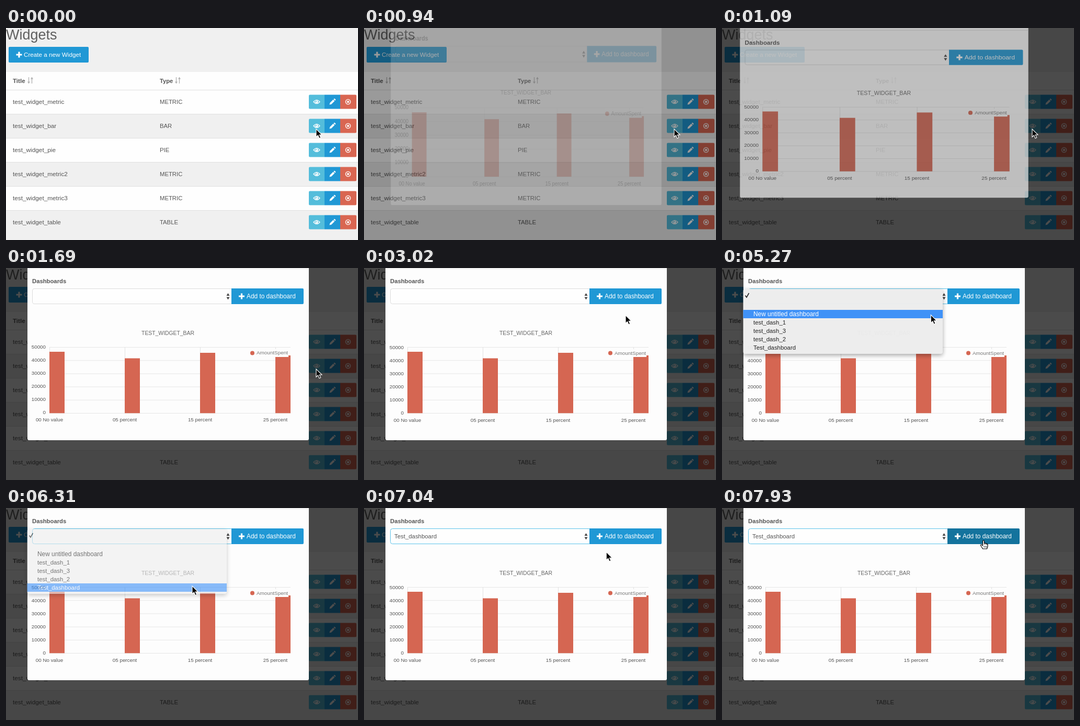
These frames come from a looping animation (673x405 px, 8000 ms). An HTML page:

```html
<!DOCTYPE html>
<html lang="en">
<head>
<meta charset="utf-8">
<title>Widgets</title>
<style>
  html, body { margin: 0; width: 100%; height: 100%; overflow: hidden; background: #f0f0f0; }
  svg { display: block; width: 673px; height: 405px; font-family: "Liberation Sans", Arial, sans-serif; }
</style>
</head>
<body>
<svg id="stage" viewBox="0 0 673 405" xmlns="http://www.w3.org/2000/svg"></svg>
<script>
const LOOP = 8000;
const BLUE = [32, 152, 213], DARK_BLUE = [20, 115, 157], RED = '#d56652';
const OPEN_AT = 862, OPEN_MS = 760;
const MENU_OPEN = 4370, MENU_FADE = 6310, MENU_CLOSED = 6450;

const rgb = c => `rgb(${c.map(Math.round)})`;
const mix = (a, b, k) => a.map((v, i) => v + (b[i] - v) * k);
const clamp = v => Math.max(0, Math.min(1, v));
const ease = k => (1 - Math.cos(Math.PI * clamp(k))) / 2;

const rect = (x, y, w, h, fill, extra = '') =>
  `<rect x="${x}" y="${y}" width="${w}" height="${h}" fill="${fill}" ${extra}/>`;
const text = (x, y, size, str, fill = '#555', extra = '') =>
  `<text x="${x}" y="${y}" font-size="${size}" fill="${fill}" ${extra}>${str}</text>`;
const path = (d, fill, extra = '') => `<path d="${d}" fill="${fill}" ${extra}/>`;
const line = (d, color, width = 1) => path(d, 'none', `stroke="${color}" stroke-width="${width}"`);
const group = (attrs, body) => `<g ${attrs}>${body}</g>`;
const at = (x, y, body) => group(`transform="translate(${x} ${y})"`, body);

const plus = (x, y) => line(`M${x - 5.5} ${y}h11M${x} ${y - 5.5}v11`, '#fff', 3.2);
const sortIcon = x => at(x, 94,
  line('M2.5 0V10M8.5 2V12', '#b0b0b0', 1.3) +
  path('M0 8.5h5l-2.5 4zM6 3.5h5l-2.5-4z', '#b0b0b0'));

const eye = at(594, 0,
  path('M-6 0Q0-7 6 0Q0 7-6 0z', 'none', 'stroke="#fff" stroke-width="1.2"') +
  '<circle r="2.7" fill="#fff"/><circle cx="-.6" cy="-.8" r="1" fill="#54bddb"/>');
const pencil = at(624, 0,
  path('M-5.5 5.5l.8-3.4L1.6-4.2l2.7 2.7L-2 4.8zM2.4-5l1-1q.6-.4 1.2 0l1.5 1.5q.4.6 0 1.2l-1 1z', '#fff'));
const cross = at(654, 0,
  '<circle r="4.6" fill="none" stroke="#fff" stroke-width="1.4"/>' +
  line('M-1.9-1.9L1.9 1.9M1.9-1.9L-1.9 1.9', '#fff', 1.5));

function rowButtons(y) {
  return at(0, y,
    path('M609-13.500h-28q-2 0-2 2v23q0 2 2 2h28z', '#54bddb') +
    rect(609, -13.5, 30, 27, rgb(BLUE)) +
    path('M639-13.500h29q2 0 2 2v23q0 2-2 2h-29z', '#d96652') +
    eye + pencil + cross);
}

function page() {
  const rows = [['metric', 'METRIC'], ['bar', 'BAR'], ['pie', 'PIE'],
    ['metric2', 'METRIC'], ['metric3', 'METRIC'], ['table', 'TABLE']];
  const table = rows.map(([name, type], i) => {
    const y = 141 + 46 * i;
    return rect(0, y - 22, 673, 46, i % 2 ? '#f0f0f0' : '#fefefe') +
      rect(0, y - 23, 673, 1, '#dfdfdf') +
      text(13, y + 4, 11.8, 'test_widget_' + name) +
      text(294, y + 4, 11.3, type) + rowButtons(y);
  }).join('');
  return rect(0, 0, 673, 405, '#f0f0f0') +
    text(0, 22, 27, 'Widgets', '#606060') +
    rect(5, 36, 153, 30, rgb(BLUE), 'rx="2"') + plus(25, 51) +
    text(34, 55, 11.7, 'Create a new Widget', '#fff') +
    rect(0, 84, 673, 35, '#fefefe') +
    text(13, 105, 11.6, 'Title', '#555', 'font-weight="bold"') + sortIcon(41) +
    text(294, 105, 11.2, 'Type', '#555', 'font-weight="bold"') + sortIcon(323) + table;
}

function chart() {
  const columns = [['00 No value', 160], ['05 percent', 172.5], ['15 percent', 162], ['25 percent', 167]];
  let out = text(309.5, 128, 10.4, 'TEST_WIDGET_BAR', '#666', 'text-anchor="middle"');
  for (let i = 0; i <= 5; i++) {
    const y = 151.5 + 25.2 * i;
    out += line(`M83 ${y}H544`, '#e6e6e6') +
      text(76, 154.5 + 25 * i, 9.8, i < 5 ? (5 - i) * 10000 : 0, '#555', 'text-anchor="end"');
  }
  columns.forEach(([label, top], i) => {
    const x = 83 + 144 * i;
    out += line(`M${x + .5} 151V277`, '#e2e2e2') + rect(x, top, 29, 277.3 - top, RED) +
      text(x, 293.5, 9.8, label, '#555', 'text-anchor="middle"');
  });
  return out + rect(465, 155, 75, 15, '#fdfdfd') +
    `<circle cx="471" cy="162.500" r="4" fill="${RED}"/>` +
    text(479, 165.5, 9.9, 'AmountSpent', '#777');
}

function modal() {
  return rect(41, -60, 538, 389, '#fdfdfd', 'rx="3"') + rect(41, 0.5, 538, 1, '#ddd') +
    text(50, 29, 11.3, 'Dashboards', '#555', 'font-weight="bold"') +
    rect(50.5, 39.5, 384, 29, '#fefefe', 'id="select" rx="4"') +
    path('M421.500 53l3-5 3 5zM421.500 55.500l3 5 3-5z', '#444') +
    text(58, 58, 11.4, 'Test_dashboard', '#555', 'id="choice"') +
    path('M431 39h136q2 0 2 2v26q0 2-2 2h-136z', rgb(BLUE), 'id="add"') + plus(450.5, 54) +
    text(460, 58, 11.9, 'Add to dashboard', '#fff') + chart();
}

const options = [['', 44], ['New untitled dashboard', 80], ['test_dash_1', 96],
  ['test_dash_3', 112], ['test_dash_2', 128], ['Test_dashboard', 144]];

function menu(cursorY) {
  const active = options.findIndex(([, top]) => cursorY >= top && cursorY < top + 17);
  const ink = i => i === active ? '#fff' : '#1c1c1c';
  return rect(40.5, 40, 381.5, 124, '#ededed', 'rx="4" style="filter:drop-shadow(0 3px 4px rgba(0,0,0,.35))"') +
    (active < 0 ? '' : rect(40.5, options[active][1], 381.5, 16, '#3a8ff7')) +
    line('M44.500 52.500l2.500 3.500 4.500-8', ink(0), 1.6) +
    options.map(([label, top], i) => text(60, top + 12, i === 1 ? 11.9 : 11.4, label, ink(i))).join('');
}

const arrow = path('M0 0V15.200L3.500 12 6 17.700 8.700 16.500 6.200 11H11z', '#000',
  'stroke="#fff" stroke-width="1.100"');
const hand = path('M-1.500 9V1.200Q-1.500 0 0 0T1.500 1.200V5.500Q3 4.600 4 6 5.500 5.200 6.300 6.700 8 6.300 8 8V11Q7.500 13 6.500 16H-1.500Q-3 13-5 10.500-6 8.700-4.500 8-3 8-1.500 10z',
  '#fff', 'stroke="#000" stroke-width="1.200" stroke-linejoin="round"') +
  line('M1.500 5.500V8M4 6.500V8M6.200 7V8.500M1 10.500V13.500M3.300 10.500V13.500M5.500 10.500V13.500', '#000', .8);

const stage = document.getElementById('stage');
stage.innerHTML = page() +
  rect(0, 0, 673, 405, '#000', 'id="backdrop"') +
  group('id="modal"', modal()) + group('id="menu"', '') +
  group('id="arrow"', arrow) + group('id="hand"', hand);
const part = Object.fromEntries([...stage.querySelectorAll('[id]')].map(el => [el.id, el]));
const set = (id, attrs) => {
  for (const name in attrs) part[id].setAttribute(name, attrs[name]);
};

// The picture advances in steps: first time, last time, count.
const steps = [0];
for (const [from, to, count] of [[500, 1540, 8], [1690, 1690, 1], [2430, 3320, 7], [3620, 4070, 4],
  [4370, 4520, 2], [5120, 5710, 5], [6310, 7340, 8], [7480, 7480, 1], [7930, 7930, 1]]) {
  for (let i = 0; i < count; i++) {
    steps.push(Math.floor((from + (to - from) * i / Math.max(1, count - 1)) / 10) * 10);
  }
}

const moves = [[0, 593, 193], [2280, 593, 193], [3320, 478, 66], [3470, 478, 66], [4070, 421, 60],
  [4970, 421, 60], [5710, 356, 149], [6450, 356, 149], [7340, 500, 62], [LOOP, 500, 62]];

function cursorAt(t) {
  const i = Math.max(1, moves.findIndex(m => m[0] >= t));
  const [t0, ...a] = moves[i - 1], [t1, ...b] = moves[i];
  return mix(a, b, ease((t - t0) / (t1 - t0)));
}

function render(now) {
  const t = steps.filter(s => s <= now).pop();

  const p = (t - OPEN_AT) / OPEN_MS;
  const spring = turns => p < 0 ? .7 : 1 - .3 * Math.exp(-7.6 * p) * Math.cos(2 * Math.PI * turns * p);
  set('modal', {
    opacity: clamp((t - 880) / 320),
    transform: `translate(310 138) scale(${spring(2)} ${spring(3)}) translate(-310 -138)`
  });
  set('backdrop', { opacity: .7 * clamp((t - 770) / 300) });

  const [x, y] = cursorAt(t);
  const hover = t < 5000 ? clamp((t - 3100) / 220) * clamp((3850 - t) / 230) : clamp((t - 7120) / 330);
  const overButton = x > 431 && x < 569 && y < 69;
  set('add', { fill: rgb(mix(BLUE, DARK_BLUE, hover)) });
  set('select', { stroke: t >= MENU_OPEN ? '#5cc3ea' : '#dcdcdc' });
  set('choice', { opacity: t >= MENU_CLOSED ? 1 : 0 });

  const menuOpen = t >= MENU_OPEN && t < MENU_CLOSED;
  part.menu.innerHTML = menuOpen ? menu(y) : '';
  set('menu', { opacity: t >= MENU_FADE ? .6 : .97 });

  const transform = `translate(${x} ${y})`;
  set('arrow', { transform, opacity: overButton ? 0 : 1 });
  set('hand', { transform, opacity: overButton ? 1 : 0 });
}

const start = performance.now();
function tick() {
  render((performance.now() - start) % LOOP);
  requestAnimationFrame(tick);
}
tick();
</script>
</body>
</html>
```
